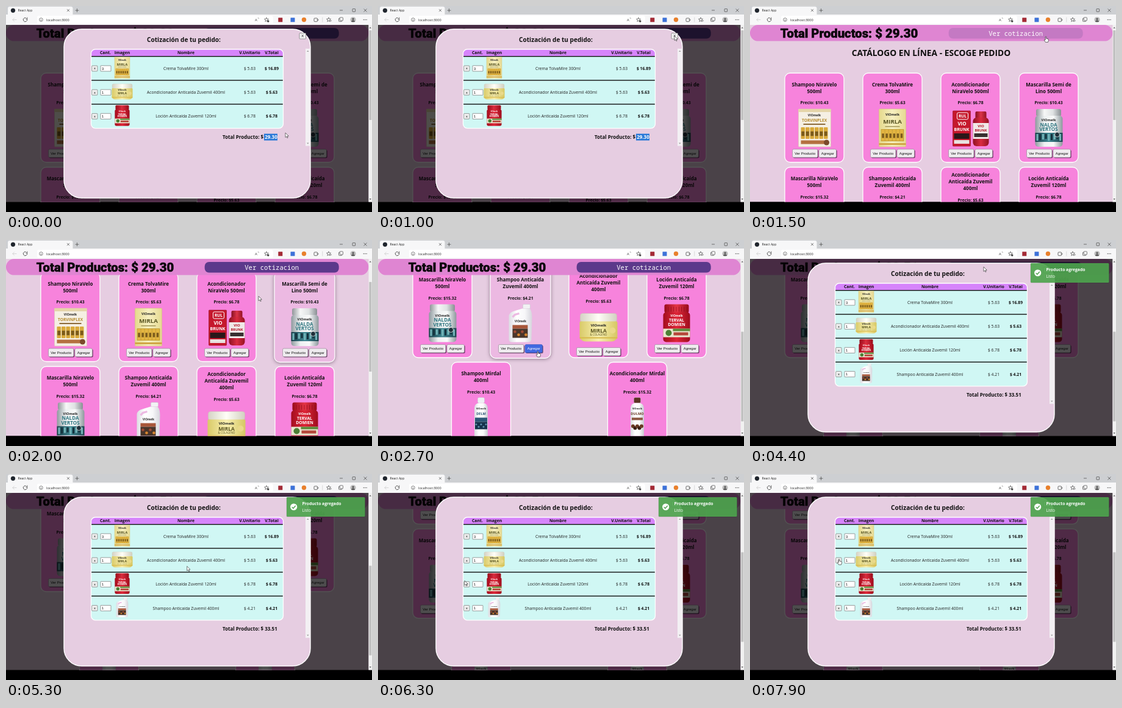
An HTML page with a canvas for the animation above (8 s loop, 600 by 338 pixels).

```html
<!DOCTYPE html>
<html lang="es">
<head>
<meta charset="utf-8">
<title>React App</title>
<style>
html, body { margin: 0; width: 100%; height: 100%; overflow: hidden; background: #000; }
canvas { display: block; width: 600px; height: 338px; }
</style>
</head>
<body>
<canvas id="stage"></canvas>
<script>
const LOOP = 8000;
const canvas = document.getElementById('stage');
const c = canvas.getContext('2d');
const dpr = window.devicePixelRatio || 1;
canvas.width = 600 * dpr;
canvas.height = 338 * dpr;

const UI = '"Open Sans", "Noto Sans", sans-serif';
const ARIAL = '"Liberation Sans", Arial, sans-serif';
const MONO = '"Noto Sans Mono", "DejaVu Sans Mono", monospace';
const HEAVY = 'Roboto, "Liberation Sans", sans-serif';
const PINK = '#f783dc', PALE = '#ecb9e2', BG = '#e6cde1';
const TOP = 31, VIEW = 290.6;

// ---------- helpers ----------
function box(x, y, w, h, r, fill, line, lw = 1) {
  c.beginPath();
  c.roundRect(x, y, w, h, r);
  if (fill) { c.fillStyle = fill; c.fill(); }
  if (line) { c.strokeStyle = line; c.lineWidth = lw; c.stroke(); }
}
function disc(x, y, r, fill, line, lw = 1) {
  c.beginPath();
  c.arc(x, y, r, 0, Math.PI * 2);
  if (fill) { c.fillStyle = fill; c.fill(); }
  if (line) { c.strokeStyle = line; c.lineWidth = lw; c.stroke(); }
}
function path(pts, line, lw = 0.8, fill) {
  c.beginPath();
  pts.forEach(([x, y], i) => i ? c.lineTo(x, y) : c.moveTo(x, y));
  if (fill) { c.closePath(); c.fillStyle = fill; c.fill(); }
  if (line) { c.strokeStyle = line; c.lineWidth = lw; c.stroke(); }
}
// y is the middle of the capital letters
function text(s, x, y, size, color = '#111', align = 'center', weight = 400, family = UI) {
  c.font = `${weight} ${size}px ${family}`;
  c.textAlign = align;
  c.fillStyle = color;
  c.fillText(s, x, y + size * 0.36);
}
const bold = (s, x, y, size, color = '#111', align = 'center') => text(s, x, y, size, color, align, 700);
const within = (p, x, y, w, h) => p.x >= x && p.x <= x + w && p.y >= y && p.y <= y + h;
const ease = k => k * k * (3 - 2 * k);
const ramp = (t, a, b) => ease(Math.min(1, Math.max(0, (t - a) / (b - a))));
function shade(x, w, stops) {
  const g = c.createLinearGradient(x, 0, x + w, 0);
  stops.forEach((s, i) => g.addColorStop(i / (stops.length - 1), s));
  return g;
}

// ---------- products, drawn around their centre ----------
const brand = (x, y, size, color = '#222') => bold('VIOmelk', x, y, size, color);

function ampoules(x, y, n, step, h, color) {
  for (let i = 0; i < n; i++) {
    box(x + i * step, y, step - 1, h, 1, color);
    box(x + i * step + 0.8, y + h * 0.35, step - 2.6, h * 0.4, 0, '#7a5a1c');
  }
}
const kits = {
  goldBox() {
    box(-26, -31, 53, 62, 1, '#f5efe3', '#d8c9a8', 0.6);
    box(-26, -31, 53, 5, 1, '#e5d5a9');
    brand(0, -21, 5);
    bold('TORVINPLEX', 0, -12.5, 6.6, '#b58a2e');
    box(-18, -7, 36, 2, 0, '#8d6b3a');
    ampoules(-22, -1, 6, 7.5, 19, '#d9a93a');
    box(-22, 20.5, 39, 6, 0, '#b4703f');
    disc(20, 24, 4.5, '#7b4a2b');
  },
  cream() {
    box(-22, -31, 44, 62, 1, shade(-22, 44, ['#e5d98c', '#f6efc0', '#e6da92']), '#d2c377', 0.6);
    brand(0, -22, 5.4);
    bold('MIRLA', 0, -10, 9.6, '#55511f');
    box(-12, -3, 24, 1.6, 0, '#a3985a');
    box(-19, 2, 38, 20, 1, '#c6a13c');
    ampoules(-18, 3, 6, 6.1, 18, '#e4b541');
    box(-22, 25, 44, 3, 0, '#d1a747');
  },
  redPair() {
    box(-29, -28, 29, 58, 1, '#c5182c', '#8f1020', 0.6);
    box(-22, -25, 18, 11, 2, '#c5182c', '#fff', 1);
    bold('RUL', -13, -19.5, 6.6, '#fff');
    bold('VIO', -14, -7, 8, '#fff');
    bold('BRUNK', -14.5, 2, 7, '#fff');
    box(-27, 9, 25, 9, 0, '#2a1719');
    box(-27, 20, 25, 6, 0, '#e8e1de');
    box(8, -27, 18, 12, 2, shade(8, 18, ['#861021', '#db3448', '#941224']));
    box(4, -17, 26, 47, 6, shade(4, 26, ['#8f1122', '#d92b40', '#971323']));
    box(4, -8, 26, 26, 0, '#f0e9e7');
    bold('VIO', 17, -3, 6, '#b11628');
    bold('BRUNK', 17, 3.5, 5.6, '#b11628');
    box(6, 9, 22, 6, 0, '#383030');
  },
  tealJar() {
    box(-20.5, -31, 41, 12, 3, shade(-21, 42, ['#8d9296', '#f6f7f7', '#dfe2e3', '#868c90']));
    box(-22, -20, 45, 51, 5, shade(-22, 45, ['#8f9a9f', '#eef1f2', '#f8f9f9', '#8d989d']));
    brand(0, -13, 5.6);
    bold('NALDA', 0, -5, 8, '#2f7680');
    bold('VERTOS', 0, 2.4, 8, '#2f7680');
    box(-22, 8, 45, 15, 0, shade(-22, 45, ['#1b3f4a', '#3f8792', '#1c424d']));
    for (let i = 0; i < 9; i++) box(-20 + i * 4.7, 10, 3, 11 - (i * 5) % 4, 0, i % 2 ? '#15323d' : '#74b5b9');
    disc(14, 11, 4, '#20303a', '#fff', 0.7);
  },
  jug() {
    box(4, -31, 12, 7, 1.5, '#f2f2f4', '#c9c9d0', 0.6);
    c.beginPath();
    c.moveTo(3, -24); c.lineTo(15, -24);
    c.quadraticCurveTo(19, -20, 19, -10); c.lineTo(18, 27);
    c.quadraticCurveTo(17, 31, 13, 31); c.lineTo(-14, 31);
    c.quadraticCurveTo(-19, 31, -19, 26); c.lineTo(-19, -12);
    c.quadraticCurveTo(-18, -18, -10, -20);
    c.closePath();
    c.fillStyle = shade(-19, 39, ['#dcdce2', '#fff', '#f7f7f9', '#d3d3da']); c.fill();
    path([[-13, -10], [-9, -14], [-2, -16]], PALE, 3.2);
    brand(0, -3, 4.4);
    box(-13, 3, 25, 6, 0, '#a8573a');
    box(-13, 9, 25, 15, 0, '#4a352a');
    for (let i = 0; i < 4; i++) disc(-9 + i * 6, 14 + (i % 2) * 5, 2.3, i % 2 ? '#d8862f' : '#a04a35');
  },
  wideJar() {
    box(-30, -23, 60, 14, 4, shade(-30, 60, ['#d5d3c5', '#fffef7', '#d2d0c1']), '#c9c6b0', 0.5);
    box(-31, -10, 62, 33, [2, 2, 9, 9], shade(-31, 62, ['#d9ca68', '#f8efb0', '#d6c763']));
    brand(0, -4, 6);
    bold('MIRLA', 0, 5, 8.4, '#58521e');
    text('& COLÁGENO', 0, 12, 4.4, '#58521e');
    box(-31, 16, 62, 2, 0, '#d8b94a');
    disc(23, 5, 5, '#ead98a');
  },
  redJar() {
    box(-20, -31, 40, 14, 3, shade(-20, 40, ['#9c0c1c', '#e53546', '#9a0b1b']));
    for (let i = 0; i < 9; i++) box(-18 + i * 4.3, -27, 0.7, 8, 0, '#8d0c1a');
    box(-22, -18, 44, 49, 5, shade(-22, 44, ['#a30d1e', '#de2537', '#9f0d1d']));
    brand(0, -12, 4.8, '#fff');
    bold('TERVAL', 0, -4.5, 6.8, '#fff');
    bold('DOMIEN', 0, 2.4, 6.8, '#fff');
    box(-22, 9, 44, 14, 0, '#e9e6cf');
    box(-6, 9, 28, 4, 0, '#5c8b3a');
    disc(-13, 16, 5, '#4c7f35');
    box(-5, 15, 24, 5, 0, '#b5473a');
  },
  blueBottle() {
    bottle('#eef0f3', 'DELM', '#2c5676');
    box(-10, 1, 20, 7, 0, '#2c5676');
    box(-10, 8, 20, 12, 0, '#16324b');
    for (let i = 0; i < 5; i++) disc(-8 + i * 4, 12 + (i % 2) * 4, 1.5, '#5f8fae');
  },
  chocoBottle() {
    bottle('#5a3324', 'DULMO', '#6b3a25');
    box(-9, 1, 18, 4, 0, '#8b5640');
    for (let i = 0; i < 5; i++) disc(-7 + i * 3.5, 15 + (i % 2) * 3, 3, i % 2 ? '#3a1e14' : '#6b3a25');
  }
};
function bottle(cap, label, ink) {
  box(-5.5, -32, 11, 9, 2, cap, '#c5c8cd', 0.4);
  box(-11, -23, 22, 62, [8, 8, 3, 3], shade(-11, 22, ['#d9dbe0', '#fff', '#fafafa', '#c8cbd1']));
  brand(0, -14, 3.8);
  bold(label, 0, -6, 5.6, ink);
}
function product(kind, x, y, k = 1) {
  c.save();
  c.translate(x, y);
  c.scale(k, k);
  kits[kind]();
  c.restore();
}

// ---------- catalogue ----------
const ROWS = [110, 264.5, 418.5];
const CARDS = [
  [57, 0, ['Shampoo NiraVelo', '500ml'], '10.43', 'goldBox'],
  [185, 0, ['Crema TolvaMire', '300ml'], '5.63', 'cream'],
  [313, 0, ['Acondicionador', 'NiraVelo 500ml'], '6.78', 'redPair'],
  [441, 0, ['Mascarilla Semi de', 'Lino 500ml'], '10.43', 'tealJar'],
  [57, 1, ['Mascarilla NiraVelo', '500ml'], '15.32', 'tealJar'],
  [185, 1, ['Shampoo Anticaída', 'Zuvemil 400ml'], '4.21', 'jug'],
  [313, 1, ['Acondicionador', 'Anticaída Zuvemil', '400ml'], '5.63', 'wideJar'],
  [441, 1, ['Loción Anticaída', 'Zuvemil 120ml'], '6.78', 'redJar'],
  [120.5, 2, ['Shampoo Mirdal', '400ml'], '10.43', 'blueBottle'],
  [376.5, 2, ['Acondicionador Mirdal', '400ml'], '15.32', 'chocoBottle']
];
const buttonTop = lines => lines.length > 2 ? 130 : 125;

function pushButton(x, y, w, label, hot) {
  box(x + 1.2, y + 1.2, w, 13.4, 2, 'rgba(60,20,60,.75)');
  box(x, y, w, 13.4, 2, hot ? '#4169e1' : '#efecef', hot ? '#3a58b8' : '#8d808d', 0.6);
  text(label, x + w / 2, y + 6.7, 5.9, hot ? '#fff' : '#111', 'center', 400, ARIAL);
}

function card([x, row, lines, price, kind], scroll, mouse) {
  const y = ROWS[row] - scroll, w = 97, h = 146.5, mid = x + w / 2;
  if (y > TOP + VIEW || y + h < TOP) return;
  const tall = lines.length > 2;
  const hot = mouse && mouse.y > 58 && within(mouse, x, y, w, h);
  const by = y + buttonTop(lines);
  const grow = hot ? 1 : 0;
  c.save();
  if (hot) {
    c.shadowColor = 'rgba(40,20,40,.55)';
    c.shadowBlur = 6 * dpr;
    c.shadowOffsetY = dpr;
  }
  box(x - grow, y - grow, w + 2 * grow, h + 2 * grow, 9, hot ? PALE : PINK);
  c.restore();
  box(x - grow, y - grow, w + 2 * grow, h + 2 * grow, 9, null, '#fff', 1.3);
  lines.forEach((s, i) => bold(s, mid, y + (tall ? 12.2 : 18.7) + i * 11.2, 8));
  bold('Precio: $' + price, mid, y + (tall ? 54 : 48.7), 6.8);
  product(kind, mid, y + (tall ? 97 : 90));
  pushButton(mid - 36, by, 41.5, 'Ver Producto', hot && within(mouse, mid - 36, by, 41.5, 13.4));
  pushButton(mid + 7.5, by, 28.5, 'Agregar', hot && within(mouse, mid + 7.5, by, 28.5, 13.4));
}

function header(total, mouse) {
  const title = 'Total Productos: $ ' + total;
  box(0, 31, 594.5, 26.6, 13.3, '#df85d2');
  text(title, 162.5, 45, 20.3, '#0c080c', 'center', 900, HEAVY);
  c.strokeStyle = '#0c080c';
  c.lineWidth = 0.5;
  c.strokeText(title, 162.5, 45 + 20.3 * 0.36);
  const x = total === '29.30' ? 325.7 : 324;
  const hot = mouse && within(mouse, x, 36, 220, 17.6);
  box(x, 36, 220, 17.6, 7, hot ? '#c479c3' : '#5c398b');
  text('Ver cotizacion', x + 110, 45, 10.6, '#fff', 'center', 500, MONO);
}

function page(scroll, total, mouse) {
  c.save();
  c.beginPath();
  c.rect(0, TOP, 600, VIEW);
  c.clip();
  c.fillStyle = BG;
  c.fillRect(0, TOP, 600, VIEW);
  bold('CATÁLOGO EN LÍNEA - ESCOGE PEDIDO', 297, 77.5 - scroll, 13.8);
  CARDS.forEach(d => card(d, scroll, mouse));
  header(total, mouse);
  c.restore();
}

function scrollbar(scroll) {
  c.fillStyle = '#f1f1f1';
  c.fillRect(594.5, TOP, 5.5, VIEW);
  c.fillStyle = '#c1c1c1';
  c.fillRect(595.3, 40 + scroll * 0.507, 4, 147);
  path([[595.6, 36.5], [597.2, 34.5], [598.8, 36.5]], null, 0, '#555');
  path([[595.6, 316], [597.2, 318], [598.8, 316]], null, 0, '#555');
}

// ---------- quotation dialog ----------
const ORDER = [
  ['3', 'Crema TolvaMire 300ml', '5.63', '16.89', 'cream', 0.57],
  ['1', 'Acondicionador Anticaída Zuvemil 400ml', '5.63', '5.63', 'wideJar', 0.55],
  ['1', 'Loción Anticaída Zuvemil 120ml', '6.78', '6.78', 'redJar', 0.55],
  ['1', 'Shampoo Anticaída Zuvemil 400ml', '4.21', '4.21', 'jug', 0.52]
];
const ROW_H = 39.2;

function smallButton(x, y, w, h, label, size) {
  box(x, y, w, h, 1, '#f0f0f0', '#777', 0.7);
  text(label, x + w / 2, y + h / 2 - 0.3, size, '#111', 'center', 400, ARIAL);
}

function dialog(count, total, selected) {
  c.fillStyle = 'rgba(0,0,0,.68)';
  c.fillRect(0, TOP, 594.5, VIEW);
  box(95, 38, 404, 277, 29, BG, '#fff', 1.4);
  bold('Cotización de tu pedido:', 291.5, 55, 10.1);
  smallButton(481, 44.5, 10.5, 9.5, 'X', 5.9);

  const h = 12 + count * ROW_H, end = 71 + h;
  c.save();
  c.beginPath();
  c.roundRect(139.5, 71, 315, h, 7);
  c.clip();
  c.fillStyle = '#d0f7f4';
  c.fillRect(139, 71, 316, h);
  c.fillStyle = '#d684fb';
  c.fillRect(139, 71, 316, 11.5);
  c.fillStyle = '#111';
  for (let i = 0; i < count; i++) c.fillRect(139, 82 + i * ROW_H, 316, 1.4);
  c.restore();
  box(139.5, 71, 315, h, 7, null, '#fff', 1.3);
  [['Cant.', 163], ['Imagen', 190.5], ['Nombre', 295], ['V.Unitario', 399.5], ['V.Total', 435.5]]
    .forEach(([s, x]) => bold(s, x, 77, 6.9));

  ORDER.slice(0, count).forEach(([n, name, unit, sum, kind, k], i) => {
    const y = 102.5 + i * ROW_H;
    smallButton(140.7, y - 4.5, 9.3, 9, 'x', 5.9);
    box(155, y - 4.6, 17, 9.2, 0.5, '#fff', '#777', 0.7);
    text(n, 157, y, 5.9, '#111', 'left', 400, ARIAL);
    product(kind, 190.5, y - 1.2, k);
    text(name, 295, y, 6.75, '#222');
    text('$ ' + unit, 399.5, y, 6.75, '#222');
    bold('$ ' + sum, 435.5, y, 6.8);
  });

  const ty = end + 14.5;
  if (selected) box(423, ty - 5.5, 22, 11, 0, '#2878d7');
  bold(total, 444.7, ty, 8, selected ? '#fff' : '#111', 'right');
  const tw = c.measureText(total).width;
  bold('Total Producto: $ ', 444.7 - tw, ty, 8, '#111', 'right');

  const foot = end + 29;
  c.fillStyle = '#f3f0f3';
  c.fillRect(491, 70, 7.5, foot - 70);
  path([[493, 75], [494.8, 73], [496.6, 75]], null, 0, '#999');
  path([[493, foot - 5], [494.8, foot - 3], [496.6, foot - 5]], null, 0, '#999');
}

function toast(t) {
  const k = ramp(t, 2950, 3250);
  if (!k) return;
  c.save();
  c.translate((1 - k) * 142, 0);
  c.globalAlpha = k;
  box(459.5, 37.8, 129.5, 33, 2, 'rgba(0,0,0,.12)');
  box(460, 38, 128.5, 32, 1.5, 'rgba(78,166,78,.9)');
  disc(471.7, 54, 5.6, '#fff');
  path([[468.8, 54.2], [470.9, 56.3], [474.8, 52]], '#57a557', 1.5);
  bold('Producto agregado', 485.5, 49, 6.8, '#fff', 'left');
  text('Listo', 485.5, 60, 6.6, '#fff', 'left');
  c.restore();
}

// ---------- browser frame ----------
function browser() {
  const ink = '#444', faint = '#cfcfcf';
  c.fillStyle = '#cdcfd2';
  c.fillRect(0, 0, 600, 15);
  c.fillStyle = '#f7f7f8';
  c.fillRect(0, 14, 600, 17);
  box(3, 1, 106.5, 14, [3, 3, 0, 0], '#f7f7f8');
  disc(11.5, 7.3, 3.6, '#20262e');
  text('React App', 19.5, 7.2, 5.1, '#222', 'left');
  path([[100, 5.2], [104, 9.2]], ink, 0.7);
  path([[104, 5.2], [100, 9.2]], ink, 0.7);
  path([[113.5, 7.2], [119.5, 7.2]], ink, 0.7);
  path([[116.5, 4.2], [116.5, 10.2]], ink, 0.7);
  path([[547, 7], [552, 7]], ink, 0.7);
  box(568, 4.7, 4.6, 4.6, 0.5, null, ink, 0.7);
  path([[586.5, 4.6], [591.5, 9.6]], ink, 0.7);
  path([[591.5, 4.6], [586.5, 9.6]], ink, 0.7);

  box(51, 16, 387, 13, 2.5, '#fff');
  path([[17.5, 22.5], [10.8, 22.5]], faint, 0.8);
  path([[13.7, 19.6], [10.8, 22.5], [13.7, 25.4]], faint, 0.8);
  c.beginPath();
  c.arc(31.5, 22.5, 3.2, -0.5, 5.1);
  c.strokeStyle = ink; c.lineWidth = 0.9; c.stroke();
  path([[34.8, 18.6], [34.8, 21.2], [32.2, 21.2]], ink, 0.8);
  disc(57.5, 22.5, 2.8, null, ink, 0.7);
  path([[57.5, 22], [57.5, 24.3]], ink, 0.7);
  text('localhost:3000', 66, 22.5, 5.6, '#222', 'left');
  text('A', 410, 22.8, 6, ink);
  path([[413, 19], [414.5, 20.8]], ink, 0.6);
  star(427, 22.5, 3.6);
  disc(429.8, 25, 1.7, ink);

  box(446.3, 19.2, 7, 7, 0.5, '#a32a35');
  box(466.5, 19.2, 7, 7, 0.5, '#3d72d8');
  disc(488.5, 22.5, 3.7, '#e8802c');
  box(505, 20, 5.6, 5.6, 1.2, null, ink, 0.8);
  disc(511, 22.8, 1.1, '#f7f7f8', ink, 0.7);
  c.fillStyle = '#c9c9c9';
  c.fillRect(518.5, 18.5, 0.7, 8);
  star(529, 22.5, 3.7);
  path([[531, 24.2], [534, 24.2]], ink, 0.7);
  box(545.5, 20.2, 5.2, 5.2, 0.8, '#f7f7f8', ink, 0.7);
  box(547.2, 18.8, 5.2, 5.2, 0.8, '#f7f7f8', ink, 0.7);
  disc(569, 22.5, 4.6, '#bdbdbd');
  disc(569, 21.2, 1.5, '#555');
  c.beginPath();
  c.arc(569, 26, 2.8, Math.PI, 0);
  c.fillStyle = '#555'; c.fill();
  for (let i = 0; i < 3; i++) disc(586.3 + i * 2.4, 22.5, 0.65, ink);
}
function star(x, y, r) {
  const pts = Array.from({ length: 11 }, (_, i) => {
    const a = i * Math.PI / 5 - Math.PI / 2, d = i % 2 ? r * 0.45 : r;
    return [x + Math.cos(a) * d, y + Math.sin(a) * d];
  });
  path(pts, '#444', 0.7);
}

// ---------- pointer ----------
const MOVES = [
  [0, 458, 208], [200, 458, 208], [950, 486, 49], [1300, 486, 49], [1450, 485, 50], [1700, 485, 50],
  [2500, 262, 182.5], [3050, 262, 182.5], [3500, 355, 112], [3800, 371, 53.8],
  [4000, 383, 44], [4550, 383, 44], [5250, 300, 150], [5800, 165, 205],
  [6300, 142, 175], [6700, 145, 179], [7200, 146, 179], [7750, 146, 139.5], [8000, 146, 139.5]
];
function pointer(t) {
  const at = Math.max(0, t);
  const i = MOVES.findIndex(m => m[0] > at) - 1;
  const [t0, x0, y0] = MOVES[i], [t1, x1, y1] = MOVES[i + 1];
  const k = ramp(at, t0, t1);
  return { x: x0 + (x1 - x0) * k, y: y0 + (y1 - y0) * k };
}
function arrow({ x, y }) {
  path([[x, y], [x, y + 7.6], [x + 1.8, y + 6], [x + 3, y + 8.6], [x + 4.2, y + 8], [x + 3, y + 5.5], [x + 5.3, y + 5.3], [x, y]],
    '#222', 0.6, '#fff');
}
function hand({ x, y }) {
  c.beginPath();
  c.moveTo(x - 0.8, y + 0.6);
  c.quadraticCurveTo(x, y - 0.8, x + 0.8, y + 0.6);
  c.lineTo(x + 0.8, y + 3.4);
  c.lineTo(x + 4, y + 4.2);
  c.quadraticCurveTo(x + 4.8, y + 4.6, x + 4.5, y + 6.3);
  c.lineTo(x + 3.5, y + 9.4);
  c.lineTo(x - 0.6, y + 9.4);
  c.lineTo(x - 2.8, y + 5.9);
  c.quadraticCurveTo(x - 2.4, y + 4.6, x - 0.8, y + 5.9);
  c.closePath();
  c.fillStyle = '#fff'; c.fill();
  c.strokeStyle = '#222'; c.lineWidth = 0.65; c.stroke();
}
function overButton(p, open, scroll) {
  if (open) return ORDER.some((_, i) => within(p, 140.7, 98 + i * ROW_H, 9.3, 9));
  if (within(p, 325, 36, 220, 17.6)) return true;
  return p.y > 58 && CARDS.some(([x, row, lines]) =>
    within(p, x + 12.5, ROWS[row] - scroll + buttonTop(lines), 72, 13.4));
}

// ---------- frame ----------
const CLOSE = 1250, ADD = 2950, OPEN = 4150, NOTCH = 43.6;

function draw(t) {
  const open = t < CLOSE || t >= OPEN;
  const added = t >= ADD;
  const total = added ? '33.51' : '29.30';
  // five wheel notches down, later one up
  const scroll = NOTCH * (5 * ramp(t, 1800, 2400) - ramp(t, 5350, 5550));
  const p = pointer(t);

  c.setTransform(dpr, 0, 0, dpr, 0, 0);
  c.fillStyle = '#000';
  c.fillRect(0, 0, 600, 338);
  page(scroll, total, open ? null : pointer(t - 120));
  if (open) dialog(added ? 4 : 3, total, !added);
  scrollbar(scroll);
  toast(t);
  browser();
  (overButton(p, open, scroll) ? hand : arrow)(p);
}

const start = performance.now();
function tick() {
  draw((performance.now() - start) % LOOP);
  requestAnimationFrame(tick);
}
tick();
</script>
</body>
</html>
```
